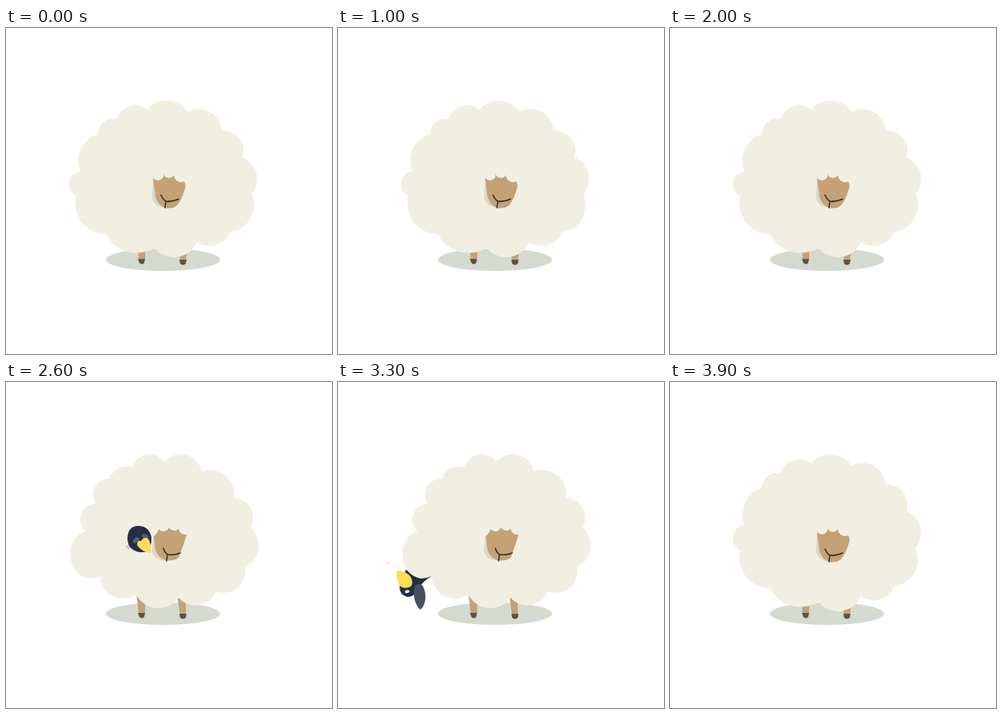
Write an HTML page that moves like this. It is 408 by 408 pixels and loops after 4200 ms.

```html
<!DOCTYPE html>
<html lang="en">
<head>
<meta charset="utf-8">
<title>Woolly sheep</title>
<style>
  html, body { margin: 0; width: 100%; height: 100%; overflow: hidden; background: #fff; }
  svg { display: block; width: 100vw; height: 100vh; }
  .wool { fill: #f1efe2; }
  .skin { fill: #c5a176; }
  .hoof { fill: #5d5249; }
  .shade { fill: #d9d7c6; }
  .cast { fill: #d0cabd; }
  .dark { fill: #252e42; }
  .wing { fill: #474f62; }
  .beak { fill: #fbdd58; }
  .white { fill: #fff; }
  .lid { fill: #566073; }
  .mouth { fill: none; stroke: #302a27; stroke-width: 1.5; stroke-linecap: round; }
  .rays { fill: none; stroke: #dcdcdc; stroke-width: 1; }
</style>
</head>
<body>
<svg viewBox="0 0 408 408">
  <ellipse cx="196.5" cy="290" rx="71.5" ry="14" fill="#d5dace"/>

  <g id="bird3">
    <path class="dark extra" d="M96 240L125 250L144 272Q120 274 97 262Z"/>
    <path class="dark" d="M85 235Q98 240 117 243Q105 250 99 261Q95 269 87 269Q77 267 77 256Z"/>
    <path class="beak" d="M73 236Q84 235 91 244Q95 252 91 256Q83 260 77 255Q73 247 73 236Z"/>
    <ellipse class="white" cx="86.500" cy="262.500" rx="3" ry="1.800" transform="rotate(-15 86 262)"/>
    <path class="rays" d="M61 226L66 227M68 229L72 232"/>
  </g>

  <g id="rest">
    <path class="skin" d="M165 270H175L174 290H166ZM216 276H227L225 292H218Z"/>
    <path class="hoof" d="M165 289H174L173 294Q170 297 167 294ZM217 290H226L225 295Q221 298 218 295Z"/>
    <path class="wool" data-bumps="88,211 93,179,17 115,133,34 138,114,19 177,102,25 227,105,31 270,128,29 296,162,26 307,208,29 281,255,33 239,268,28 186,275,31 125,258,43 88,211,38"/>
    <path class="shade" d="M184 188L183 213Q186 224 200 225L192 200Z"/>
    <path class="skin" d="M184 187A7 7 0 0 0 197 182A7 7 0 0 0 210 184A9 9 0 0 0 223 192L225 197Q221 214 214 222Q208 227 199 225Q190 221 187 211Z"/>
    <path class="mouth" d="M194 209Q197 216 201 217Q210 217 216 214M200 217L199 225"/>
  </g>

  <g id="puffed">
    <path class="skin" d="M163 262H175L174 290H166ZM214 266H225L225 292H218Z"/>
    <path class="hoof" d="M165 289H174L173 294Q170 297 167 294ZM217 290H226L225 295Q221 298 218 295Z"/>
    <path class="wool" data-bumps="117,243 104,246,30 81,218,27 100,187,27 112,152,20 130,121,20 158,107,21 198,100,22.5 245,112,27 285,145,30 306,182,24.5 299,231,29 263,262,27 216,270,28 163,266,31 117,243,29.5"/>
    <path class="shade" d="M184 192L183 213Q186 223 201 224L193 200Z"/>
    <path class="skin" d="M185 193Q190 189 191 184A7.500 7.500 0 0 0 204 182A8 8 0 0 0 216 184A9 9 0 0 0 226 191Q221 208 216 220Q209 225 200 223Q190 220 187 210Z"/>
    <path class="mouth" d="M197 208Q199 215 203 216Q211 217 218 214M202 216L201 224"/>
  </g>

  <g id="bird0">
    <path class="cast" d="M147 112Q159 104 171 104Q167 107 169 110Q165 113 161 114Q157 119 149 119Z"/>
    <path class="dark" d="M122 97Q123 86 132 86Q141 87 141 98Q143 112 151 121Q147 121 146 126Q140 123 137 128Q132 123 130 126Q127 122 123 124Q125 112 121 103Z"/>
    <path class="wing" data-pivot="144 112" data-turn="24" d="M143 112C138 98 147 83 154 82C156 95 152 108 145 112Z"/>
    <path class="beak" d="M108 114C107 104 114 98 122 98Q132 96 137 102Q133 110 123 113Q114 116 108 114Z"/>
    <g>
      <ellipse class="white" cx="124" cy="93" rx="2.600" ry="2"/>
      <ellipse class="white" cx="136" cy="97" rx="2.600" ry="2.400"/>
      <circle class="dark" cx="125" cy="93" r="1.200"/>
      <circle class="dark" cx="135.500" cy="97" r="1.200"/>
    </g>
    <path class="rays" d="M158 80L162 78M163 86L166 85"/>
  </g>

  <g id="bird1">
    <path class="cast" d="M258 138Q260 147 270 153L276 148Z"/>
    <path class="dark extra" d="M274 154L299 154L302 179Q298 185 294 178Q288 180 287 172Q278 173 274 162Z"/>
    <path class="dark" d="M279 143Q283 133 292 134Q300 137 300 147Q293 157 295 169Q289 163 285 167Q281 161 277 165Q275 160 270 159Q275 155 277 150Z"/>
    <path class="wing" data-pivot="278 151" data-turn="-18" d="M278 152C264 149 257 136 261 125Q264 121 268 123C277 130 284 144 278 152Z"/>
    <path class="beak" d="M287 149Q287 141 295 141Q304 142 311 153Q303 158 295 157Q287 155 287 149Z"/>
    <ellipse class="white" cx="289" cy="138" rx="3.500" ry="1.900" transform="rotate(-25 289 138)"/>
    <path class="rays" d="M308 131L311 134M310 138L313 136M312 147L317 150M314 154L319 154"/>
  </g>

  <g id="bird2">
    <path class="cast" d="M149 205L154 203L157 199L164 209Q159 214 156 208Q152 211 149 205Z"/>
    <path class="dark" d="M152 195Q153 180 166 180Q180 181 182 195Q182 207 177 212Q165 215 158 209Q152 205 152 195Z"/>
    <g class="closed">
      <ellipse class="lid" cx="163" cy="198" rx="4.500" ry="3" transform="rotate(-30 163 198)"/>
      <ellipse class="lid" cx="174" cy="193" rx="4.500" ry="2.600" transform="rotate(15 174 193)"/>
    </g>
    <g class="open">
      <ellipse class="white" cx="163" cy="197" rx="3.600" ry="3"/>
      <ellipse class="white" cx="174" cy="193" rx="3.600" ry="3"/>
      <circle class="dark" cx="164" cy="198" r="1.400"/>
      <circle class="dark" cx="174" cy="194" r="1.400"/>
    </g>
    <path class="beak" d="M164 204Q164 198 169 199Q172 193 178 196Q182 202 181 214Q170 213 164 204Z"/>
  </g>

  <path id="lowWing" class="wing" data-pivot="99 255" data-turn="-14" d="M96 256Q100 250 105 254C113 265 109 281 103 285C96 279 93 265 96 256Z"/>
</svg>
<script>
  const LOOP = 4200;
  const byId = id => document.getElementById(id);
  const show = (node, on) => node?.setAttribute("display", on ? "inline" : "none");

  // Each bump is "x,y,radius": an outward arc ending at x,y.
  for (const path of document.querySelectorAll("[data-bumps]")) {
    const [start, ...bumps] = path.dataset.bumps.split(" ");
    path.setAttribute("d", `M${start}` + bumps.map(bump => {
      const [x, y, r] = bump.split(",");
      return `A${r} ${r} 0 0 1 ${x} ${y}`;
    }).join("") + "Z");
  }

  // The sheep puffs up, a bird looks out and moves, then both withdraw.
  const visits = [
    { puff: 300, peek: 400, act: 600, shrink: 800, end: 1000 },
    { puff: 1300, peek: 1400, act: 1600, shrink: 1800, end: 2000 },
    { puff: 2300, peek: 2400, act: 2600, shrink: 2800, end: 3000 },
    { puff: 3300, peek: 3300, act: 3500, shrink: 3700, end: 3900, startsRaised: true }
  ].map((visit, i) => {
    const bird = byId("bird" + i);
    const part = name => bird.querySelector("." + name);
    return { ...visit, bird, extra: part("extra"), wing: part("wing"), open: part("open"), closed: part("closed") };
  });
  const lowWing = byId("lowWing");
  visits[3].wing = lowWing;

  function flap(wing, raised) {
    wing?.setAttribute("transform", `rotate(${raised ? 0 : wing.dataset.turn} ${wing.dataset.pivot})`);
  }

  function render(t) {
    const puffed = visits.some(v => t >= v.puff && t < v.shrink);
    show(byId("puffed"), puffed);
    show(byId("rest"), !puffed);

    for (const v of visits) {
      const visible = t >= v.peek && t < v.end;
      const acting = t >= v.act && t < v.shrink;
      show(v.bird, visible);
      show(v.extra, t >= v.shrink);
      show(v.closed, acting);
      show(v.open, !acting);
      flap(v.wing, acting !== Boolean(v.startsRaised));
      if (v.wing === lowWing) show(lowWing, visible);
    }
  }

  const begin = performance.now();
  function tick() {
    render((performance.now() - begin) % LOOP);
    requestAnimationFrame(tick);
  }
  tick();
</script>
</body>
</html>
```
